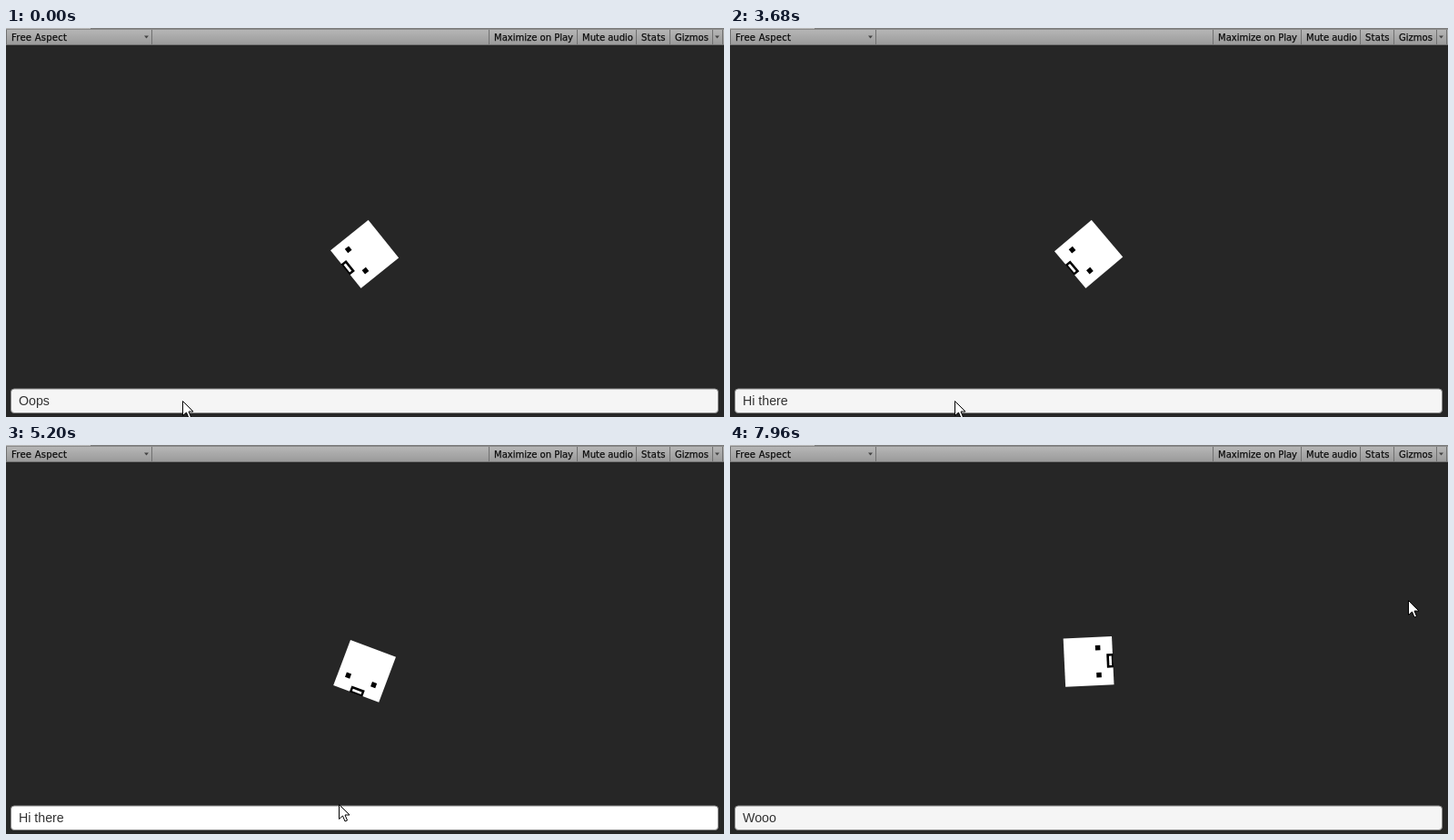
An HTML page that plays this animation: 790x429 px, repeating every 8 s.

```html
<!DOCTYPE html>
<html lang="en">
<head>
<meta charset="utf-8">
<style>
  html, body { margin: 0; height: 100%; overflow: hidden; background: #262626; }
  svg { display: block; }
  text { white-space: pre; }
  .bar { font: 10px "DejaVu Sans", sans-serif; }
  .bar text { fill: #0c0c0c; stroke: #0c0c0c; stroke-width: .25; }
  .input { font: 14.2px "Liberation Sans", Arial, sans-serif; fill: #323232; }
  .speech { font: 34px "Liberation Sans", Arial, sans-serif; fill: #f00; text-anchor: middle; }
</style>
</head>
<body>
<svg width="790" height="429" viewBox="0 0 790 429">
  <defs>
    <linearGradient id="metal" x2="0" y2="1">
      <stop stop-color="#b9b9b9"/><stop offset="1" stop-color="#9b9b9b"/>
    </linearGradient>
  </defs>
  <rect width="790" height="429" fill="#262626"/>

  <g class="bar">
    <rect width="790" height="18" fill="url(#metal)"/>
    <rect x="93" width="697" height="2" fill="#7c7c7c"/>
    <rect y="1" width="790" height="1" fill="#8a8a8a"/>
    <rect y="18" width="790" height="1" fill="#747474"/>
    <path d="M.5 2V18M160.5 2V18M531.5 2V18M628.5 2V18M693.5 2V18M730.5 2V18M777.5 2V18M788.5 2V18" stroke="#707070"/>
    <path d="M152 8.5h5l-2.5 3zM780 8.5h5l-2.5 3z" fill="#444"/>
    <text x="6" y="14" letter-spacing=".25">Free Aspect</text>
    <text x="537" y="14">Maximize on Play</text>
    <text x="634" y="14">Mute audio</text>
    <text x="699" y="14" letter-spacing=".25">Stats</text>
    <text x="736" y="14">Gizmos</text>
  </g>

  <g id="face">
    <rect x="-26.7" y="-26.7" width="53.4" height="53.4" fill="#fff"/>
    <path d="M8 -17.5h5.5v5.5h-5.5zM8 12.5h5.5v5.5h-5.5z"/>
    <rect x="20" y="-7.7" width="7.2" height="15.4"/>
    <rect x="22.6" y="-5.2" width="2.8" height="10.4" fill="#fff"/>
  </g>
  <text id="speech" class="speech" y="10">Hi there</text>

  <rect id="field" x="5.5" y="398" width="778" height="26.5" rx="3.5" stroke="#8c8c8c"/>
  <rect id="mark" x="14" y="403" height="16" fill="#b0d2fb"/>
  <text id="typed" class="input" x="14" y="416"></text>
  <rect id="caret" y="403" width="1" height="14" fill="#8a8a8a"/>

  <path id="cursor" d="M0 0V16L4 12.5L6.5 18.5L9 17.5L6.5 11.5H11.5Z" fill="#fff" stroke="#000" stroke-linejoin="round"/>
</svg>
<script>
const LOOP = 8000, STEP = 40, KEY_TIME = 90, CARET_TIME = 440;
const HOME = { x: 394.6, y: 249.4 };

// pointer strokes: each one starts where the last one ended
const strokes = [
  { start: 0, time: 320, x: 201, y: 413 },
  { start: 3640, time: 770, x: 513, y: 220 },
  { start: 4680, time: 200, x: 470, y: 330 },
  { start: 4880, time: 280, x: 341, y: 392 },
  { start: 5160, time: 120, x: 376, y: 407 },
  { start: 7745, time: 400, x: 787, y: -17 }
];
// typing bursts: "kept" letters are already there
const bursts = [
  { start: -1000, kept: 0, text: "Oops" },
  { start: 1360, kept: 0, text: "H" },
  { start: 1880, kept: 1, text: "Hi" },
  { start: 2470, kept: 2, text: "Hi t" },
  { start: 2760, kept: 4, text: "Hi there" },
  { start: 6480, kept: 0, text: "W" },
  { start: 6800, kept: 1, text: "Wooo" }
];
const clicks = [240, 5600];
const blur = 4240, hover = 5360;
const hops = [4160, 7880], HOP_TIME = 320, HOP_HEIGHT = 14;
const speech = { start: 4280, end: 5200, angle: -14.4, from: 25, speed: 0.5 };

const el = id => document.getElementById(id);
const set = (id, attrs) => { for (const k in attrs) el(id).setAttribute(k, attrs[k]); };
const show = (id, on) => set(id, { visibility: on ? "visible" : "hidden" });
const ramp = (t, start, time = 100) => Math.min(1, Math.max(0, (t - start) / time));
const easeOut = f => 1 - (1 - f) ** 3;
const smooth = f => f * f * (3 - 2 * f);

// sideways the hand is quick at once, up and down it gathers speed
function pointer(t) {
  let x = 194, y = 411;
  for (const s of strokes) {
    const f = ramp(t, s.start, s.time);
    x += (s.x - x) * easeOut(f);
    y += (s.y - y) * smooth(f);
  }
  return { x, y };
}

function hopHeight(t) {
  return hops.reduce((sum, h) => {
    const f = ramp(t, h, HOP_TIME);
    return sum + 4 * HOP_HEIGHT * f * (1 - f);
  }, 0);
}

function drawFace(t) {
  // it looks at where the pointer was one step ago
  const look = pointer(t - STEP);
  const angle = Math.atan2(look.y - HOME.y, look.x - HOME.x) * 180 / Math.PI;
  set("face", { transform: `translate(${HOME.x} ${HOME.y - hopHeight(t)}) rotate(${angle})` });
}

function drawSpeech(t) {
  const dist = speech.from + speech.speed * (t - speech.start);
  set("speech", { transform: `translate(${HOME.x} ${HOME.y}) rotate(${speech.angle}) translate(${dist} 0)` });
  show("speech", t >= speech.start && t < speech.end);
}

function drawInput(t) {
  const press = clicks.reduce((sum, c) => sum + ramp(t, c - 40) - ramp(t, c + 100), 0);
  const grey = Math.round(245 + 10 * (ramp(t, blur) - ramp(t, hover)) - 45 * press);
  set("field", { fill: `rgb(${grey},${grey},${grey})` });

  const burst = bursts.filter(b => b.start <= t).pop();
  const keys = Math.min(burst.text.length - burst.kept, 1 + Math.floor((t - burst.start) / KEY_TIME));
  const lastKey = burst.start + (keys - 1) * KEY_TIME;
  el("typed").textContent = burst.text.slice(0, burst.kept + keys);

  const width = el("typed").getComputedTextLength();
  set("mark", { width });
  show("mark", clicks.some(c => c <= t && c > burst.start));
  set("caret", { x: Math.round(14 + width) });
  show("caret", t < lastKey + CARET_TIME);
}

function draw(t) {
  drawFace(t);
  drawSpeech(t);
  drawInput(t);
  const p = pointer(t);
  set("cursor", { transform: `translate(${Math.round(p.x) + 0.5} ${Math.round(p.y) + 0.5})` });
}

const begin = performance.now();
function tick() {
  const t = (performance.now() - begin) % LOOP;
  draw(Math.floor(t / STEP) * STEP);
  requestAnimationFrame(tick);
}
tick();
</script>
</body>
</html>
```
